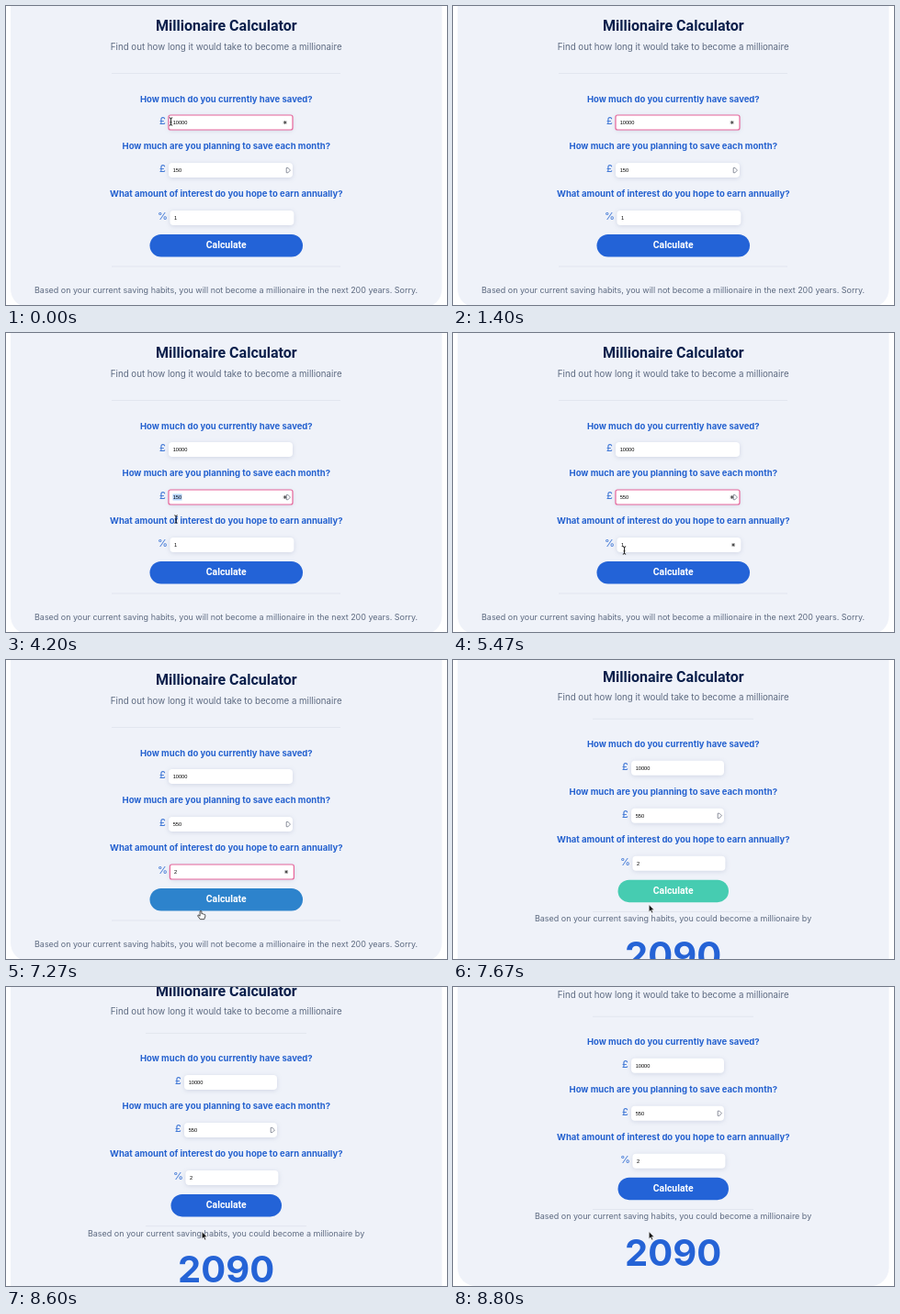
Write an HTML page that moves like this. It is 480x326 px and loops after 8870 ms.

```html
<!DOCTYPE html>
<html lang="en">
<head>
<meta charset="utf-8">
<title>Millionaire Calculator</title>
<style>
  html, body { margin: 0; width: 100%; height: 100%; overflow: hidden; background: #fff; }
  svg { display: block; width: 480px; height: 326px; }
  text { text-anchor: middle; white-space: pre; }
  .title { font: 700 16px Roboto, sans-serif; fill: #0b1f4b; }
  .sub { font: 400 9.73px Inter, sans-serif; fill: #5d6a80; }
  .question { font: 700 9.5px Inter, sans-serif; fill: #2461cf; }
  .unit { font: 500 11px Inter, sans-serif; fill: #4279d6; }
  .value { font: 400 5.65px "Liberation Sans", Arial, sans-serif; fill: #000; text-anchor: start; }
  .label { font: 700 10.4px Roboto, sans-serif; fill: #fff; }
  .result { font: 400 8.96px Inter, sans-serif; fill: #5d6a80; }
  .year { font: 700 40px Inter, sans-serif; fill: #2563d6; }
  .box { fill: #fff; filter: drop-shadow(0 1px 2.5px rgba(60, 80, 130, .17)); }
  .ring { fill: none; stroke: #e8669b; stroke-width: 1.2; }
  .rule { fill: #e2e6ef; }
</style>
</head>
<body>
<svg id="stage" viewBox="0 0 480 326"></svg>
<script>
const LOOP = 8870;
const CLICK = 7660;
const HOVER = 7150;
const FADE = 600;
const BLUE = [35, 99, 215];
const GREEN = [70, 205, 177];

const QUESTIONS = [
  'How much do you currently have saved?',
  'How much are you planning to save each month?',
  'What amount of interest do you hope to earn annually?'
];

const LAYOUTS = [
  {
    bottom: 328.5, title: 26.7, sub: 48.4, rules: [73, 283.5], ruleX: 115, ruleW: 249,
    question: 104.5, field: 119, fieldX: 177, fieldW: 135, unitX: 170.5,
    button: 249, buttonX: 156.5, buttonW: 166.5, result: 313.3,
    text: 'Based on your current saving habits, you will not become a millionaire in the next 200 years. Sorry.'
  },
  {
    bottom: 356.3, title: 22, sub: 42.3, rules: [62, 272.3], ruleX: 152, ruleW: 175,
    question: 93.5, field: 108, fieldX: 194, fieldW: 101, unitX: 187.5,
    button: 238, buttonX: 179.5, buttonW: 120.5, result: 283.8, year: 334.6,
    text: 'Based on your current saving habits, you could become a millionaire by'
  }
];

// time, x, y, pointer shape from this time on
const POINTER = [
  [0, 179.5, 126, 'beam'], [70, 179.5, 126, 'beam'], [170, 212, 141, 'arrow'],
  [300, 207, 136, 'beam'], [400, 202, 131.5, 'beam'], [2270, 202, 131.5, 'beam'],
  [2450, 198, 143, 'arrow'], [2800, 188, 172, 'beam'], [3000, 186, 180, 'beam'],
  [3930, 186, 180, 'beam'], [4200, 185, 203, 'beam'], [5130, 185, 203, 'beam'],
  [5300, 185.5, 226, 'beam'], [5470, 186.5, 237, 'beam'], [6800, 186.5, 237, 'beam'],
  [6960, 190, 241, 'arrow'], [HOVER, 202, 250, 'hand'], [7270, 212, 273.5, 'hand'],
  [7500, 213.3, 266.8, 'hand'], [CLICK, 213.3, 266.8, 'arrow']
];
const HIDDEN = [[930, 1930], [4470, 5130], [6470, 6800]];
const CARETS = [
  [0, 930, 1400], [0, 1930, 2400], [1, 3470, 3930],
  [1, 4470, 5000], [2, 6000, 6470]
];
const SCROLL = [[8400, 1.7], [8470, 0], [8600, -12], [8730, -25.5], [8800, -30.3]];
const FOCUS = [[0, 0], [3400, 1], [5870, 2], [7600, -1]];
const VALUES = [
  [[0, '10000']],
  [[0, '150'], [4465, '5'], [4595, '55'], [4865, '550']],
  [[0, '1'], [6465, ''], [6525, '2']]
];

const stage = document.getElementById('stage');

function add(parent, tag, attrs, text) {
  const node = document.createElementNS('http://www.w3.org/2000/svg', tag);
  for (const key in attrs) node.setAttribute(key, attrs[key]);
  if (text !== undefined) node.textContent = text;
  parent.appendChild(node);
  return node;
}

const write = (parent, cls, x, y, text) => add(parent, 'text', { class: cls, x, y }, text);
const show = (node, on) => node.setAttribute('visibility', on ? 'visible' : 'hidden');
const within = (t, a, b) => t >= a && t < b;

function stepAt(table, t) {
  let row = table[0];
  for (const next of table) if (next[0] <= t) row = next;
  return row;
}

function tween(table, t, col) {
  const i = table.findIndex(row => row[0] > t);
  if (i < 0) return table[table.length - 1][col];
  if (i === 0) return table[0][col];
  const a = table[i - 1], b = table[i];
  return a[col] + (b[col] - a[col]) * (t - a[0]) / (b[0] - a[0]);
}

function buildField(parent, layout, i) {
  const x = layout.fieldX + (i === 2 ? 1.4 : 0);
  const y = layout.field + i * 52;
  const w = layout.fieldW;
  const frame = { x, y, width: w, height: 16 };
  write(parent, 'unit', layout.unitX, y + 10.2, i === 2 ? '%' : '£');
  add(parent, 'rect', { class: 'box', rx: 4, ...frame });
  const mark = add(parent, 'rect', { x: x + 4.5, y: y + 4.5, width: 10, height: 7, fill: '#b4d5fe' });
  const value = write(parent, 'value', x + 4.7, y + 10.2, '');
  const caret = add(parent, 'rect', { y: y + 5, width: .6, height: 6.5, fill: '#111' });
  const icon = add(parent, 'path', {
    d: `M${x + 124.7} ${y + 8}h4M${x + 126.7} ${y + 6}v4m-1.4 -3.4l2.8 2.8m0 -2.8l-2.8 2.8`,
    stroke: '#333', 'stroke-width': .7
  });
  if (i === 1) {
    add(parent, 'path', {
      d: `M${x + w - 6.8} ${y + 5.5}h1.7l2.6 2.6l-2.6 2.6h-1.7z`,
      fill: 'none', stroke: '#7d8391', 'stroke-width': .9
    });
  }
  const ring = add(parent, 'rect', { class: 'ring', rx: 2, ...frame });
  return { x, y, w, mark, value, caret, icon, ring };
}

function buildPage(layout) {
  const group = add(stage, 'g', {});
  add(group, 'rect', { x: 5, y: -60, width: 469.5, height: layout.bottom + 60, rx: 20, fill: '#eff2f9' });
  write(group, 'title', 239.8, layout.title, 'Millionaire Calculator');
  write(group, 'sub', 239.7, layout.sub, 'Find out how long it would take to become a millionaire');
  for (const y of layout.rules) {
    add(group, 'rect', { class: 'rule', x: layout.ruleX, y, width: layout.ruleW, height: 1 });
  }
  QUESTIONS.forEach((q, i) => write(group, 'question', 239.8, layout.question + i * 51.8, q));
  const fields = QUESTIONS.map((q, i) => buildField(group, layout, i));
  const button = add(group, 'rect', {
    x: layout.buttonX, y: layout.button, width: layout.buttonW, height: 24.5, rx: 12.25
  });
  write(group, 'label', 239.7, layout.button + 15.3, 'Calculate');
  write(group, 'result', 239.6, layout.result, layout.text);
  if (layout.year) write(group, 'year', 239.6, layout.year, '2090');
  return { group, fields, button };
}

const pages = LAYOUTS.map(buildPage);

const cursor = add(stage, 'g', {});
const shapes = {
  beam: ['M-1.7 -4.2Q0 -4.2 0 -3Q0 -4.2 1.7 -4.2M0 -3V3M-1.7 4.2Q0 4.2 0 3Q0 4.2 1.7 4.2M-1 .8H1', 'none', '#111', .9],
  arrow: ['M0 0V7.8L1.8 6.2L3 9L4.3 8.4L3.1 5.7H5.6Z', '#111', '#fff', .5],
  hand: ['M-.9 .5Q0 -.6 .9 .5V3.2Q1.8 2.7 2.3 3.5Q3.2 3 3.6 3.9Q4.8 3.6 4.8 4.8V6.4L3.8 9.2H-.7L-3.3 5.6Q-3.3 4.3 -2.2 4.7L-.9 5.8Z', '#fff', '#222', .8]
};
for (const kind in shapes) {
  const [d, fill, stroke, width] = shapes[kind];
  shapes[kind] = add(cursor, 'path', { d, fill, stroke, 'stroke-width': width, 'stroke-linejoin': 'round' });
}

// CSS "ease", solved by bisection
function ease(p) {
  if (p <= 0 || p >= 1) return p <= 0 ? 0 : 1;
  const curve = (u, a, b) => 3 * u * (1 - u) ** 2 * a + 3 * u * u * (1 - u) * b + u ** 3;
  let lo = 0, hi = 1;
  for (let i = 0; i < 16; i++) {
    const mid = (lo + hi) / 2;
    if (curve(mid, .25, .25) < p) lo = mid; else hi = mid;
  }
  return curve(lo, .1, 1);
}

function render(t) {
  const done = t >= CLICK;
  const page = pages[done ? 1 : 0];
  pages.forEach(p => p.group.setAttribute('display', p === page ? 'inline' : 'none'));
  page.group.setAttribute('transform', `translate(0 ${done ? tween(SCROLL, t, 1) : 0})`);

  const x = tween(POINTER, t, 1);
  const y = tween(POINTER, t, 2);
  const visible = !HIDDEN.some(([a, b]) => within(t, a, b));
  const kind = stepAt(POINTER, t)[3];
  cursor.setAttribute('transform', `translate(${x} ${y})`);
  for (const name in shapes) show(shapes[name], visible && name === kind);

  const focus = stepAt(FOCUS, t)[1];
  page.fields.forEach((f, i) => {
    const text = stepAt(VALUES[i], t)[1];
    const hover = visible && x > f.x && x < f.x + f.w && y > f.y && y < f.y + 16;
    f.value.textContent = text;
    f.caret.setAttribute('x', f.x + 4.9 + text.length * 3.14);
    show(f.caret, CARETS.some(([n, a, b]) => n === i && within(t, a, b)));
    show(f.mark, i === 1 && within(t, 4130, 4465));
    show(f.ring, focus === i);
    show(f.icon, !done && (focus === i || hover));
  });

  const mix = done ? 1 - ease((t - CLICK) / FADE) : ease((t - HOVER) / FADE);
  const rgb = BLUE.map((c, i) => Math.round(c + (GREEN[i] - c) * mix));
  page.button.setAttribute('fill', `rgb(${rgb})`);
}

const start = performance.now();
function tick() {
  render((performance.now() - start) % LOOP);
  requestAnimationFrame(tick);
}
tick();
</script>
</body>
</html>
```
